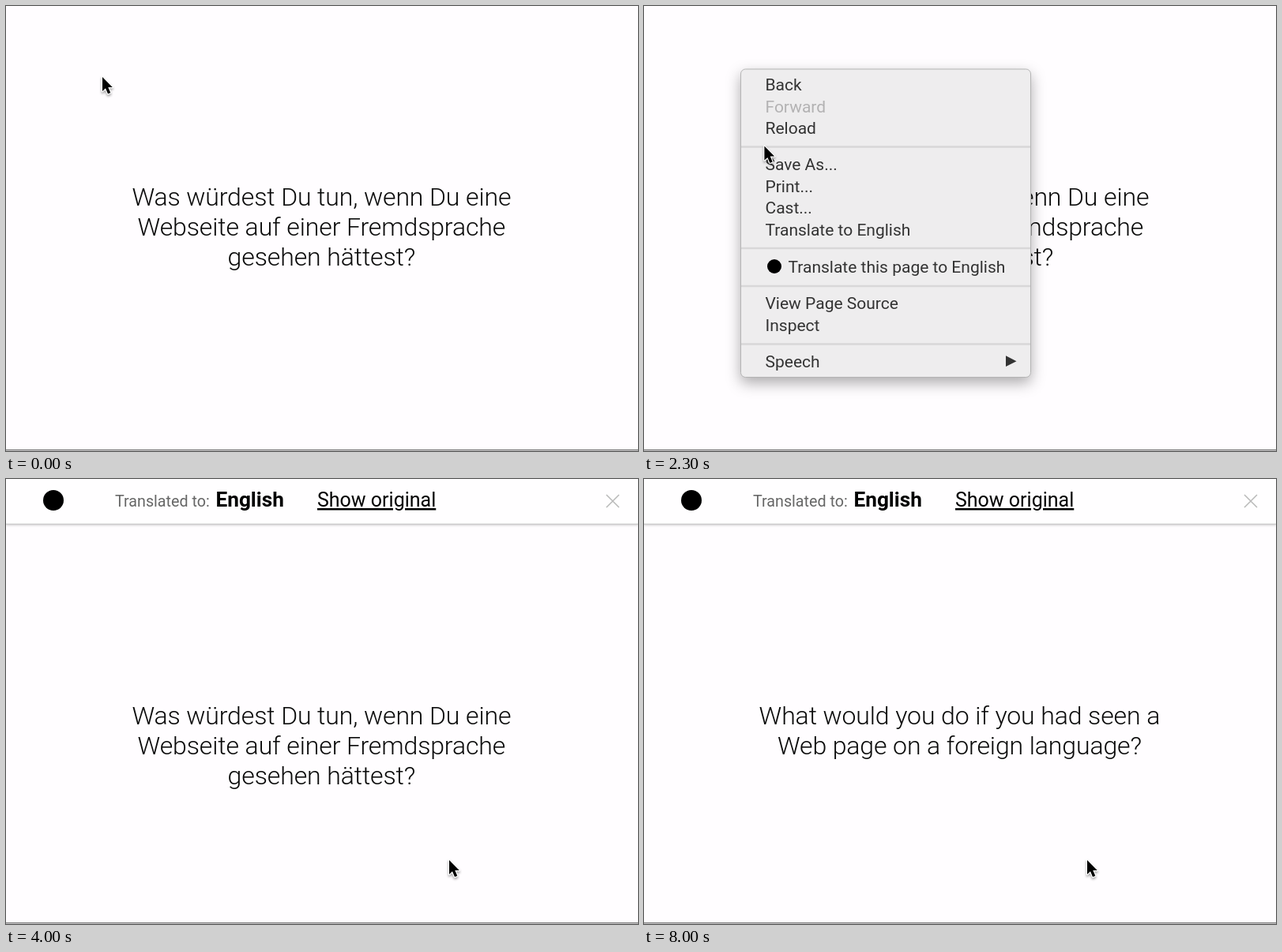
Recreate the animation shown at these times as an HTML page. Size 800x564 px, loop 8100 ms.

```html
<!DOCTYPE html>
<html lang="de">
<head>
<meta charset="utf-8">
<title>Page translation</title>
<style>
  html, body { margin: 0; width: 100%; height: 100%; overflow: hidden; background: #fffdff; }
  svg { display: block; width: 100%; height: 100%; font-family: Roboto, Inter, sans-serif; }
  #headline { font-size: 32px; font-weight: 300; letter-spacing: -.12px; text-anchor: middle; fill: #0a0a0a; }
  #panel { fill: #eeedee; stroke: #b4b4b4; filter: drop-shadow(0 7px 9px rgba(0, 0, 0, .32)); }
  #menu text { font-size: 21px; fill: #333; }
  #menu .off text { fill: #b3b2b3; }
  #menu .row rect { fill: none; }
  #menu .hot rect { fill: #4a98fb; }
  #menu .hot text { fill: #fff; }
  #bar { filter: drop-shadow(0 1px 1.5px rgba(0, 0, 0, .2)); }
  #cursor { filter: drop-shadow(0 2px 1.5px rgba(0, 0, 0, .35)); }
</style>
</head>
<body>
<svg viewBox="0 0 800 564">
  <rect y="562" width="800" height="1.4" fill="#777"/>
  <g id="headline"></g>
  <g id="bar">
    <rect y="-4" width="800" height="61" fill="#fffeff"/>
    <rect y="56.6" width="800" height="1" fill="#c4c4c4"/>
  </g>
  <g id="barItems">
    <circle cx="60" cy="27" r="13"/>
    <text x="138" y="35" font-size="19.7" fill="#666">Translated to:</text>
    <text x="265.5" y="35" font-size="26.2" font-weight="700">English</text>
    <text x="394" y="35" font-size="25" text-decoration="underline">Show original</text>
    <path d="M760 20l16 16m0-16l-16 16" stroke="#b8b8b8" stroke-width="1.5"/>
  </g>
  <g id="menu">
    <rect id="panel" x="122.5" y="80" width="367" height="390.5" rx="6"/>
    <path d="M123 178.5h366M123 307h366M123 355h366M123 428.5h366" stroke="#d8d7d8" stroke-width="2.5"/>
    <g id="rows"></g>
    <circle cx="165" cy="330" r="9"/>
    <path d="M458 443.3l13.5 6.9-13.5 6.9z" fill="#333"/>
  </g>
  <circle id="ring" cx="121" cy="86" r="31.3" fill="none" stroke="#5c5c5c" stroke-width="2.6"/>
  <path id="cursor" d="M0 0V18L4 14.3 7 21.3 10.3 19.9 7.3 13H12.8Z"
        stroke="#fff" stroke-width="2.4" stroke-linejoin="round" paint-order="stroke"/>
</svg>
<script>
const LOOP = 8100, STEP = 100;
const MENU_OPEN = 1400, RING_END = 2000, MENU_CLOSE = 3000, BAR_SHOW = 3800, TRANSLATED = 5000;
const $ = id => document.getElementById(id);

const german = ['Was würdest Du tun, wenn Du eine', 'Webseite auf einer Fremdsprache', 'gesehen hättest?'];
const english = ['What would you do if you had seen a', 'Web page on a foreign language?', ''];

// label, vertical centre, optional text x and row height
const items = [
  ['Back', 99.5], ['Forward', 127.5], ['Reload', 155],
  ['Save As...', 200.5], ['Print...', 228.5], ['Cast...', 256], ['Translate to English', 284],
  ['Translate this page to English', 330.5, 182.5, 31],
  ['View Page Source', 377], ['Inspect', 405], ['Speech', 450.3]
];

$('headline').innerHTML = german.map((_, i) => `<text x="399.4" y="${253 + 38 * i}"></text>`).join('');
$('rows').innerHTML = items.map(([label, y, x = 153.5, h = 27.8]) =>
  `<g class="row${label === 'Forward' ? ' off' : ''}">
     <rect x="123" y="${y - h / 2}" width="366" height="${h}"/>
     <text x="${x}" y="${y + 7.3}">${label}</text>
   </g>`).join('');
const lines = [...$('headline').children], rows = [...$('rows').children];

const ease = (t, from, to) => {
  const p = Math.min(1, Math.max(0, (t - from) / (to - from)));
  return p * p * (3 - 2 * p);
};
const mix = (a, b, u) => a + (b - a) * u;
const curve = (a, b, c, u) => mix(mix(a, b, u), mix(b, c, u), u);
const show = (id, on) => $(id).style.display = on ? '' : 'none';

function pointer(t) {
  if (t < 2000) {
    const u = ease(t, 300, 700);
    return [mix(122, 121.5, u), mix(90, 85.5, u)];
  }
  if (t < MENU_CLOSE) {
    const u = ease(t, 2000, 2700);
    return [mix(121.5, 200, u), mix(85.5, 319.5, u)];
  }
  const u = ease(t, MENU_CLOSE, 3950);
  return [curve(200, 290, 561, u), curve(319.5, 324, 483, u)];
}

function draw(t) {
  const [x, y] = pointer(t);
  const bar = t >= BAR_SHOW;
  $('cursor').setAttribute('transform', `translate(${x} ${y})`);
  show('menu', t >= MENU_OPEN && t < MENU_CLOSE);
  show('ring', t >= MENU_OPEN && t < RING_END);
  show('bar', bar);
  show('barItems', bar);
  $('headline').setAttribute('transform', `translate(0 ${bar ? 58 : 0})`);
  const words = t >= TRANSLATED ? english : german;
  lines.forEach((line, i) => line.textContent = words[i]);
  rows.forEach((row, i) => {
    const [label, mid, , h = 27.8] = items[i];
    row.classList.toggle('hot', label !== 'Forward' && x > 122 && Math.abs(y - mid) < h / 2);
  });
}

function tick(now) {
  draw(Math.floor(now % LOOP / STEP) * STEP);
  requestAnimationFrame(tick);
}
draw(0);
requestAnimationFrame(tick);
</script>
</body>
</html>
```
